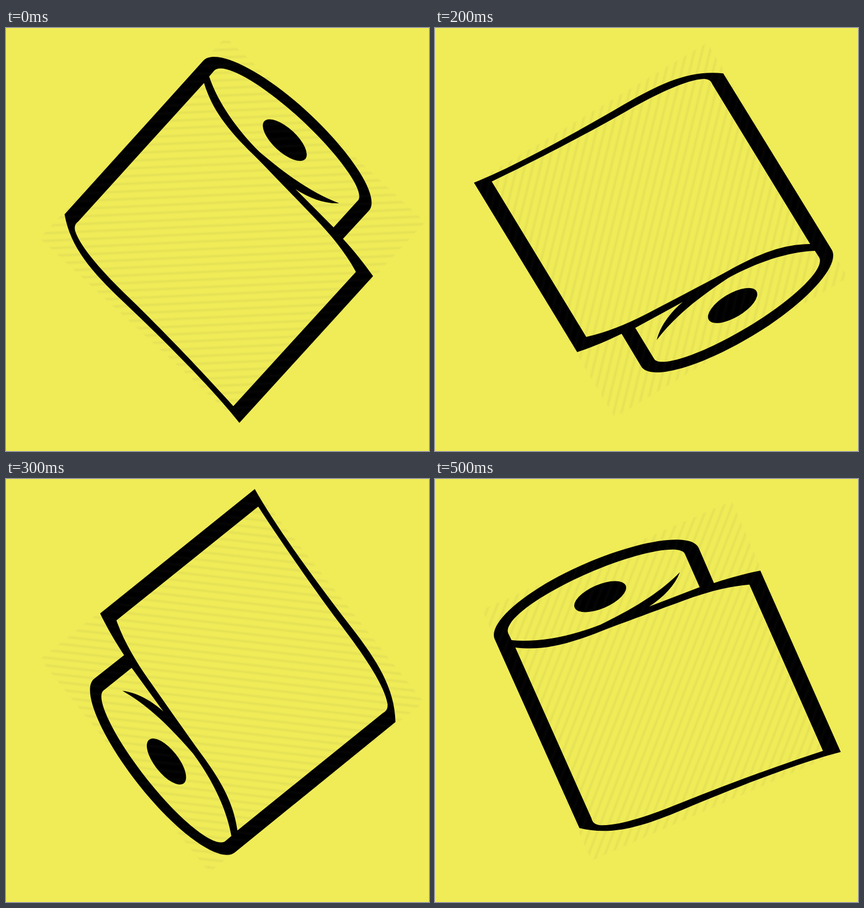
Animation of 748 by 748 pixels, one loop 0.6 s. Source, as an HTML page:

```html
<!DOCTYPE html>
<html lang="en">
<head>
<meta charset="utf-8">
<title>Spinning paper roll</title>
<style>
  html, body { margin: 0; width: 100%; height: 100%; overflow: hidden; background: #f0ec57; }
  svg { display: block; width: 100%; height: 100%; }
</style>
</head>
<body>
<svg viewBox="0 0 748 748">
  <defs>
    <linearGradient id="hatch" gradientUnits="userSpaceOnUse" spreadMethod="repeat"
      x1="0" y1="-2.04" x2="0" y2="11.44" gradientTransform="translate(400 357) rotate(44.7)">
      <stop offset=".2" stop-color="#505050" stop-opacity="0"/>
      <stop offset=".5" stop-color="#505050" stop-opacity=".07"/>
      <stop offset=".8" stop-color="#505050" stop-opacity="0"/>
    </linearGradient>
  </defs>
  <rect width="748" height="748" fill="#f0ec57"/>
  <g id="roll">
    <!-- outline with the sheet and the roll's end cut out -->
    <path fill-rule="evenodd" d="
      M219 120.6 L585 116.4 C617.5 116.4 643.6 206 643.6 314 C643.6 423 619.5 511.5 589 511.5
      L521.5 511.5 C519 541 515 568 509 595.5 L158 598
      C170 525 175 400 176 300 C177 225 183 168 219 120.6 Z
      M226 147 C219 145.5 214 148.5 210 154.5 C194.5 182 189.5 245 188.3 300
      C186 400 179 500 172.5 570 L494 568
      C507 530 512 490 514.5 450 C518 390 521 340 523 295
      C525 228 533 185 557 144 Z
      M571.5 143 L585 142.5 C608 142 626 219 626 313.5 C626 408 609 485 589 485
      L525 485.5 L529 390 C534 420 545 446 563 464
      C546 422 537 372 534 299 C536 243 548 186 571.5 143 Z"/>
    <ellipse cx="579.7" cy="317.5" rx="21" ry="49.2"/>
    <rect x="158" y="117" width="484" height="481" fill="url(#hatch)"/>
  </g>
</svg>
<script>
  const roll = document.getElementById('roll');
  const angles = [-47.25, 0, 59.05, 141.6, 220.6, 246.5];
  const hold = 100;

  function draw(time) {
    const step = Math.floor(time / hold) % angles.length;
    roll.setAttribute('transform', `rotate(${angles[step]} 400 357)`);
  }

  function tick() {
    draw(performance.now());
    requestAnimationFrame(tick);
  }
  tick();
</script>
</body>
</html>
```
